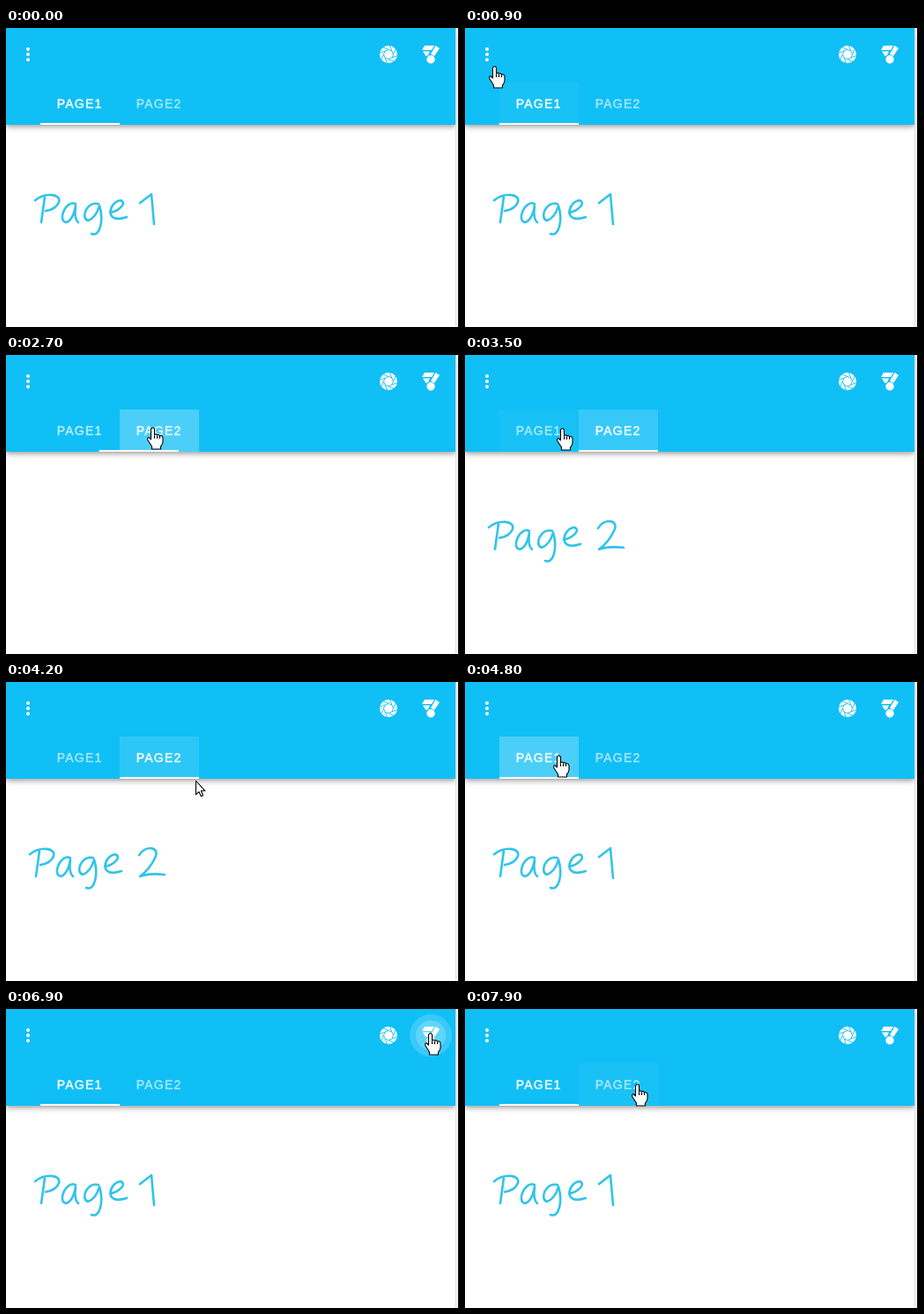
An HTML page with a canvas for the animation above (8 s loop, 514 by 340 pixels).

```html
<!DOCTYPE html>
<html lang="en">
<head>
<meta charset="utf-8">
<title>Tabs</title>
<style>
  html, body { margin: 0; width: 514px; height: 340px; overflow: hidden; background: #fff; }
  canvas { display: block; }
</style>
</head>
<body>
<canvas id="stage" width="514" height="340"></canvas>
<script>
const ctx = document.getElementById('stage').getContext('2d');
const LOOP = 8000, STEP = 100, TAU = Math.PI * 2;
const BLUE = '#10bff6', INK = '#30c4e9';
const BAR = { w: 510, h: 110 };
const TAB = { x: 39, y: 62, w: 90, h: 48 };
const BUTTONS = [
  { x: 25, click: 1200 },
  { x: 434, click: 5700 },
  { x: 482, click: 6800 }
].map(b => ({ ...b, y: 30, r: 24 }));
const TAB_CLICKS = [{ at: 2500, tab: 1 }, { at: 4400, tab: 0 }];
const BLUR_AT = 5700;

// Pointer moves: start, end, destination x and y; it rests in between.
const ENTRY = [500, 325];
const MOVES = [
  [100, 800, 31, 25], [800, 900, 33, 44], [1500, 2100, 166, 83],
  [3200, 3500, 110, 84], [3500, 3900, 148, 211], [4000, 4200, 215, 112],
  [4200, 4400, 106, 84], [4900, 5300, 260, 209], [5300, 5700, 433, 27],
  [6200, 6600, 481, 28], [7000, 7800, 195, 86]
];

const WORD = new Path2D(
  'M44 192L40 221M33 196C44 187 63 188 60 198Q57 206 45 208' +
  'M79 200C68 195 58 219 68 221Q76 219 79 202Q77 217 82 221' +
  'M105 200C92 196 84 216 93 219Q102 216 106 202C111 218 107 238 97 234' +
  'M118 210C128 208 138 199 130 196C117 197 110 224 137 215');
const DIGITS = [
  new Path2D('M152 199L165 189L168 223'),
  new Path2D('M151 197C157 185 176 187 169 200Q163 213 152 221Q162 217 180 219')
];
const HAND = new Path2D('M-1.5 1Q.5-1.5 2.5 1V8Q4.5 6 5.5 8Q7.5 7 8.5 9Q11.5 8 12 11V16' +
  'Q11.5 19 9.5 21V24H-.5V21Q-3 17-5 14Q-6 10-3.5 11L-1.5 13Z');
const ARROW = new Path2D('M.5.5V16L4 12.8L6.3 18L8.6 17L6.4 11.8H11Z');

const clamp = v => Math.max(0, Math.min(1, v));
const ease = v => { v = clamp(v); return v * v * (3 - 2 * v); };
const mix = (a, b, k) => a + (b - a) * k;
const white = a => `rgba(255,255,255,${a})`;

function pointerAt(t) {
  if (t < MOVES[0][0]) return null;
  return MOVES.reduce(([px, py], [start, end, x, y]) => {
    const k = ease((t - start) / (end - start));
    return [mix(px, x, k), mix(py, y, k)];
  }, ENTRY);
}

const overTab = (p, i) => p && p[0] >= TAB.x + i * TAB.w && p[0] < TAB.x + (i + 1) * TAB.w &&
  p[1] >= TAB.y && p[1] < TAB.y + TAB.h;

function disc(x, y, r, color) {
  ctx.fillStyle = color;
  ctx.beginPath();
  ctx.arc(x, y, r, 0, TAU);
  ctx.fill();
}

function polygon(...points) {
  ctx.fillStyle = '#fff';
  ctx.beginPath();
  points.forEach(p => ctx.lineTo(...p));
  ctx.fill();
}

function drawIris(x, y) {
  const blades = 8;
  const corner = (i, r) => [x + r * Math.cos(i * TAU / blades), y + r * Math.sin(i * TAU / blades)];
  disc(x, y, 10, '#fff');
  ctx.strokeStyle = BLUE;
  ctx.lineWidth = 0.9;
  ctx.beginPath();
  for (let i = 0; i < blades; i++) {
    ctx.moveTo(...corner(i, 5.5));
    ctx.lineTo(...corner(i - 1, 5.5));
    ctx.lineTo(...corner(i - 1.8, 10));
  }
  ctx.stroke();
}

function drawMedal() {
  polygon([475, 20], [486, 20], [483, 25], [472, 25]);
  polygon([487.5, 20], [492, 23], [486, 32], [482, 29.5]);
  polygon([473, 26.5], [481, 26.5], [479, 31], [476.5, 32]);
  disc(482, 35.8, 4.7, '#fff');
}

function drawButtonRipple({ x, y, r, click }, t) {
  const age = t - click;
  if (age < 0 || age >= 700) return;
  const fade = 1 - clamp((age - 300) / 400);
  disc(x, y, r, white(0.17 * fade));
  disc(x, y, Math.min(r, 10 + 0.07 * age), white(0.2 * fade));
}

function drawLabel(text, x, y, alpha) {
  ctx.fillStyle = ctx.strokeStyle = white(alpha);
  ctx.lineWidth = 0.4;
  ctx.fillText(text, x, y);
  ctx.strokeText(text, x, y);
}

function drawTabs(t) {
  const last = TAB_CLICKS.filter(c => t >= c.at).pop();
  const active = last ? last.tab : 0;
  const moved = last ? ease((t - last.at) / 300) : 1;
  const position = last ? (active ? moved : 1 - moved) : 0;

  for (let i = 0; i < 2; i++) {
    const x = TAB.x + i * TAB.w;
    const hovered = [0, 100, 200, 300].some(d => overTab(pointerAt(t - d), i));
    const focused = last && active === i && t < BLUR_AT;
    ctx.fillStyle = white((hovered ? 0.035 : 0) + (focused ? 0.12 : 0));
    ctx.fillRect(x, TAB.y, TAB.w, TAB.h);

    const age = focused ? t - last.at : -1;
    if (age >= 0 && age < 700) {
      ctx.save();
      ctx.beginPath();
      ctx.rect(x, TAB.y, TAB.w, TAB.h);
      ctx.clip();
      disc(...pointerAt(last.at), 12 + 90 * ease(age / 300), white(0.1 * (1 - clamp((age - 400) / 300))));
      ctx.restore();
    }
    drawLabel('PAGE' + (i + 1), x + 18.7, 91, 0.6 + 0.4 * (i ? position : 1 - position));
  }
  ctx.fillStyle = '#fff';
  ctx.fillRect(TAB.x + position * TAB.w, 108, TAB.w, 2);
}

function drawBarShadow(offset, blur, spread, alpha) {
  ctx.save();
  ctx.shadowColor = `rgba(0,0,0,${alpha})`;
  ctx.shadowBlur = blur;
  ctx.shadowOffsetY = offset;
  ctx.fillStyle = BLUE;
  ctx.fillRect(-spread, 0, BAR.w + 2 * spread, BAR.h + spread);
  ctx.restore();
}

function drawHeader(t) {
  drawBarShadow(2, 4, -1, 0.2);
  drawBarShadow(4, 5, 0, 0.14);
  drawBarShadow(1, 10, 0, 0.12);
  ctx.fillStyle = BLUE;
  ctx.fillRect(0, 0, BAR.w, BAR.h);

  [24, 30, 36].forEach(y => disc(25, y, 2, '#fff'));
  drawIris(434, 30);
  drawMedal();
  BUTTONS.forEach(b => drawButtonRipple(b, t));
  drawTabs(t);
}

// The old page fades out before the new one fades in.
function drawPage(t) {
  let page = 0, alpha = 1;
  for (const { at, tab } of TAB_CLICKS) {
    const age = t - at;
    if (age < 0) break;
    page = age < 200 ? 1 - tab : tab;
    alpha = clamp(Math.abs(age - 200) / 200);
  }
  ctx.save();
  ctx.globalAlpha = alpha;
  ctx.strokeStyle = INK;
  ctx.lineWidth = 2.6;
  ctx.lineCap = ctx.lineJoin = 'round';
  ctx.stroke(DIGITS[page]);
  ctx.translate(page ? -6 : 0, 0);
  ctx.stroke(WORD);
  ctx.restore();
}

function drawPointer(t) {
  const p = pointerAt(t);
  if (!p) return;
  const onButton = BUTTONS.some(b => Math.hypot(p[0] - b.x, p[1] - b.y) < b.r);
  const clickable = onButton || overTab(p, 0) || overTab(p, 1);
  const shape = clickable ? HAND : ARROW;
  ctx.save();
  ctx.translate(...p);
  ctx.fillStyle = '#fff';
  ctx.strokeStyle = '#000';
  ctx.lineWidth = 1.1;
  ctx.lineJoin = 'round';
  ctx.fill(shape);
  ctx.stroke(shape);
  if (clickable) {
    ctx.beginPath();
    for (let x = 2.5; x < 9; x += 3) {
      ctx.moveTo(x, 8.5);
      ctx.lineTo(x, 12);
    }
    ctx.stroke();
  }
  ctx.restore();
}

function drawEdge() {
  ctx.fillStyle = '#dcdcdc';
  ctx.fillRect(510, 0, 1, 340);
  ctx.fillStyle = '#000';
  ctx.fillRect(513, 0, 1, 340);
}

function render(t) {
  ctx.fillStyle = '#fff';
  ctx.fillRect(0, 0, 514, 340);
  ctx.font = '14px "Liberation Sans", Arial, sans-serif';
  ctx.letterSpacing = '1.25px';
  drawHeader(t);
  drawPage(t);
  drawEdge();
  drawPointer(t);
}

function tick() {
  render(Math.floor(performance.now() % LOOP / STEP) * STEP);
  requestAnimationFrame(tick);
}
tick();
</script>
</body>
</html>
```
